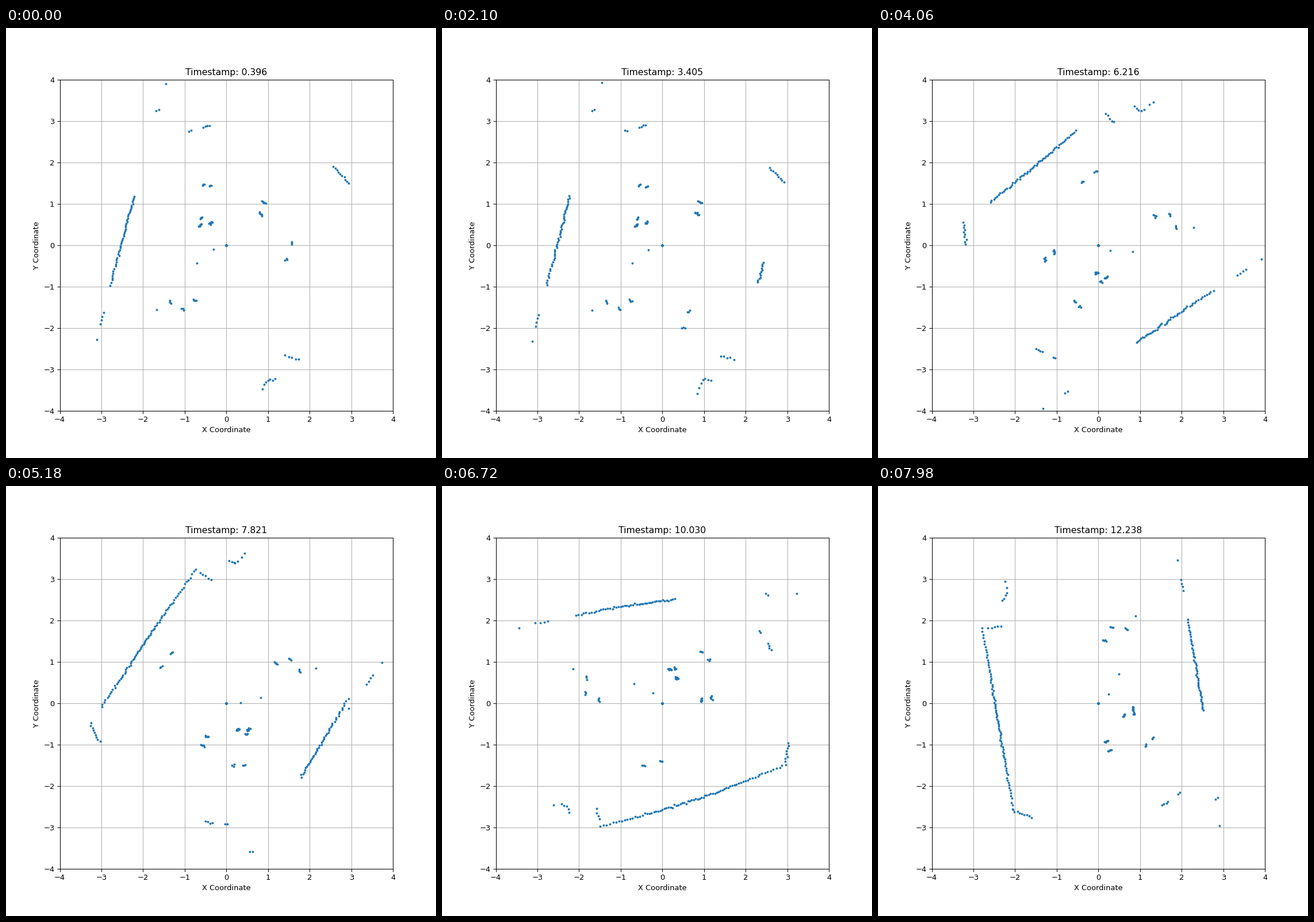
A matplotlib script that plays this animation: 748 px wide and 748 px high, repeating every 8 s.

```python
import numpy as np
import matplotlib.pyplot as plt
from matplotlib.animation import FuncAnimation

STEP, TICK, LOOP = 140, 40, 8000  # ms
LAST = LOOP // STEP
RES = np.radians(1.05)            # angle between two returns
NOISE = .014                      # range error
SWEEP = .7                        # part of a step one sweep takes

# Room as seen at heading 0: a corridor with two walls
AXIS = np.radians(75.5)
ALONG = np.array([np.cos(AXIS), np.sin(AXIS)])
ACROSS = np.array([-ALONG[1], ALONG[0]])
HALF_WIDTH = 2.45

CORNER = [(2.95, 1.5), (2.55, 1.9)]
ALCOVE = [(.84, -3.62), (.9, -3.36), (1, -3.24), (1.18, -3.25)]
LEDGE = [(1.36, -2.65), (1.73, -2.75)]

# x, y, number of returns
FIXED = [
    (-.31, -.1, 1), (-.72, -.43, 1), (-1.69, -1.57, 1),
    (-1.35, -1.37, 3), (-1.04, -1.54, 3), (-.76, -1.33, 4),
    (-.48, 2.87, 4), (-.88, 2.78, 2), (-1.65, 3.25, 2), (-1.45, 3.9, 1),
]
# x, y before and after being moved, number of returns
MOVED = [
    (-.38, .54, -.45, .53, 7), (-.63, .48, -.7, .46, 7), (-.6, .65, -.68, .58, 4),
    (.9, 1.04, .22, 1.15, 5), (.83, .76, .2, .92, 6),
    (-.55, 1.45, -.85, 1.3, 3), (-.38, 1.42, -.62, 1.4, 3),
]
WALK_N = [0, 9, 20, 37, 48, 53]
WALK_X = [1.5, .67, .48, 1.7, 1.12, 4.5]
WALK_Y = [-.15, -1.48, -2.05, -.5, -.97, -4.5]

# Heading in degrees and its rate per step
TURN_N = np.array([0, 16, 20, 29, 37, 48, LAST])
TURN = [0, 0, 17, 143, 161, -63, -156]
RATE = [0, 0, 8, 14, -8, -32, 0]

SCANS = [0, 9, 20, 29, 37, 48, 59]
STAMPS = [.396, 2.201, 4.409, 6.216, 7.821, 10.030, 12.238]


def heading(n):
    n = np.clip(n, 0, LAST)
    i = min(np.searchsorted(TURN_N, n, side="right"), len(TURN_N) - 1) - 1
    span = TURN_N[i + 1] - TURN_N[i]
    u = (n - TURN_N[i]) / span
    ease = u * u * (3 - 2 * u)
    bend = span * u * (1 - u) * (RATE[i] * (1 - u) - RATE[i + 1] * u)
    return TURN[i] + (TURN[i + 1] - TURN[i]) * ease + bend


def cross(a, b):
    return a[0] * b[1] - a[1] * b[0]


def line(p, q, rng):
    """Bearings and ranges of the rays that hit the segment p-q."""
    p, q = np.array(p), np.array(q)
    arc = np.arctan2(cross(p, q), p @ q)
    steps = np.arange(rng.random() * RES, abs(arc), RES)
    bearing = np.arctan2(p[1], p[0]) + np.sign(arc) * steps
    ray = np.cos(bearing), np.sin(bearing)
    return bearing, cross(p, q - p) / cross(ray, q - p)


def blob(x, y, count):
    spread = (np.arange(count) - (count - 1) / 2) * RES
    return np.arctan2(y, x) + spread, np.full(count, np.hypot(x, y))


def wall(side, start, end, rng):
    base = side * HALF_WIDTH * ACROSS
    return line(base + start * ALONG, base + end * ALONG, rng)


def hits(n, rng):
    yield wall(1, .62, -1.7, rng)
    yield wall(1, -2.3, -2.65, rng)
    yield wall(1, -3, -3.1, rng)

    # the other wall comes into view bit by bit
    ahead = np.interp(n, [5, 20, 30, 48], [0, .3, 1.5, 2.2])
    behind = np.interp(n, [5, 20, 37], [0, .5, 2.3])
    if ahead > 0:
        yield wall(-1, ahead, -behind, rng)

    for path in (CORNER, ALCOVE, LEDGE):
        for p, q in zip(path, path[1:]):
            yield line(p, q, rng)

    for item in FIXED:
        yield blob(*item)

    t = np.clip((n - 28) / 8, 0, 1)
    for x0, y0, x1, y1, count in MOVED:
        yield blob(x0 + (x1 - x0) * t, y0 + (y1 - y0) * t, count)

    x, y = np.interp(n, WALK_N, WALK_X), np.interp(n, WALK_N, WALK_Y)
    for leg in (-1, 1):
        yield blob(x + .06 * leg, y + .2 * leg, 3)


def scan(n):
    rng = np.random.default_rng(n)
    bearing, dist = (np.concatenate(c) for c in zip(*hits(n, rng)))
    dist = dist + rng.normal(0, NOISE, dist.size)

    # turning during a sweep shears the picture
    rate = np.radians(heading(n + .5) - heading(n - .5))
    bearing = (bearing + np.radians(heading(n))) % (2 * np.pi)
    bearing = bearing - SWEEP * rate * (bearing / (2 * np.pi) - .5)

    empty = np.zeros(30)  # rays without an echo land on the origin
    return (np.r_[dist * np.cos(bearing), empty],
            np.r_[dist * np.sin(bearing), empty])


def stamp(n):
    lost = 2 * (n >= 53)  # two scans were dropped
    return np.interp(n + lost, SCANS, STAMPS)


fig, ax = plt.subplots(figsize=(8, 8), dpi=93.5)
ax.set(xlim=(-4, 4), ylim=(-4, 4), xlabel="X Coordinate", ylabel="Y Coordinate")
ax.grid(True)
dots, = ax.plot([], [], "o", markersize=2)
title = ax.set_title("")


def draw(i):
    n = min((i * TICK + TICK - 1) // STEP, LAST)
    dots.set_data(*scan(n))
    title.set_text(f"Timestamp: {stamp(n):.3f}")
    return dots, title


anim = FuncAnimation(fig, draw, frames=LOOP // TICK, interval=TICK,
                     repeat=True, repeat_delay=0, blit=False)
plt.show()
```
